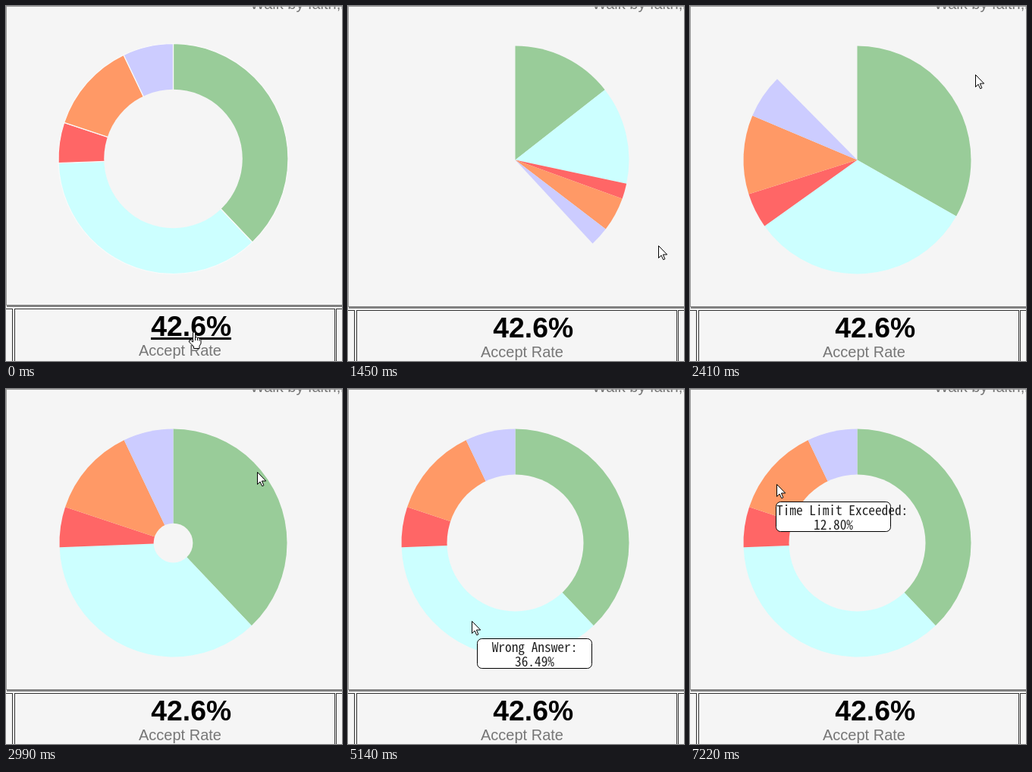
Animation of 443 by 467 pixels, one loop 8000 ms. Source, as an HTML page with a canvas:

```html
<!DOCTYPE html>
<html lang="en">
<head>
<meta charset="utf-8">
<title>Accept rate</title>
<style>
html, body { margin: 0; width: 100%; height: 100%; overflow: hidden; background: #f5f5f5; }
canvas { display: block; width: 443px; height: 467px; }
</style>
</head>
<body>
<canvas id="stage" width="443" height="467"></canvas>
<script>
const ctx = document.getElementById('stage').getContext('2d');
const LOOP = 8000, RELOAD = 720, LEAVE_LINK = 1010, TIPS_ON = 3450;
const TAU = Math.PI * 2;
const BG = '#f5f5f5';
const SANS = '"Liberation Sans", Arial, sans-serif';
const MONO = '300 17.33px "Noto Sans Mono CJK SC", "Noto Sans Mono", monospace';
const CX = 220.5, CY = 202.5, RADIUS = 150, HOLE = 90;

const slices = [
  { name: 'Accepted', share: 37.91, color: '#99cc99' },
  { name: 'Wrong Answer', share: 36.49, color: '#ccffff' },
  { name: 'Runtime Error', share: 5.69, color: '#ff6666' },
  { name: 'Time Limit Exceeded', share: 12.80, color: '#ff9966' },
  { name: 'Other', share: 7.11, color: '#ccccff' }
];

// Stops of the pointer: time, x, y.
const stops = [
  [0, 247, 428], [140, 247, 426], [870, 247, 426], [1450, 409, 315],
  [2410, 376, 90], [3400, 300, 122], [3800, 311, 146], [4350, 315, 270],
  [4750, 208, 305], [5140, 163, 305], [5730, 97, 185], [6830, 97, 185],
  [7150, 114, 125]
];

const arrow = new Path2D('M.5 .5V16.5L4 13L6.7 18.7L8.9 17.8L6.4 12H11.7Z');
const hand = new Path2D('M-.5 13V2Q1 -.5 2.5 2V8Q4.5 6.5 5.5 8.5Q7.3 7.5 8 9.5' +
  'Q10 9 10 11.5V16L8 19.5V22.5H.5V20L-5.5 14Q-6.2 11 -3.5 11.5L-.5 14Z' +
  'M2.5 8V12M5.5 8.5V12M8 9.5V12.5');

const clamp01 = v => Math.max(0, Math.min(1, v));
const ramp = (t, start, length) => clamp01((t - start) / length);

function pointerAt(t) {
  const next = stops.findIndex(s => s[0] > t);
  const b = stops[next < 0 ? stops.length - 1 : next];
  const a = next < 0 ? b : stops[next - 1];
  const k = a === b ? 0 : (t - a[0]) / (b[0] - a[0]);
  return [1, 2].map(i => Math.round(a[i] + (b[i] - a[i]) * k));
}

function sliceAt(x, y) {
  const dx = x - CX, dy = y - CY, r = Math.hypot(dx, dy);
  if (r < HOLE || r > RADIUS) return null;
  let rest = (Math.atan2(dx, -dy) / TAU + 1) % 1 * 100;
  return slices.find(s => (rest -= s.share) < 0);
}

function rect(x, y, w, h, color) {
  ctx.fillStyle = color;
  ctx.fillRect(x, y, w, h);
}

function text(str, x, y, font, color) {
  ctx.font = font;
  ctx.fillStyle = color;
  ctx.fillText(str, x, y);
}

function pie(cy, radius, hole, sweep, outlined) {
  let from = -TAU / 4;
  for (const s of slices) {
    const to = from + sweep * TAU * s.share / 100;
    ctx.beginPath();
    ctx.moveTo(CX, cy);
    ctx.arc(CX, cy, radius, from, to);
    ctx.closePath();
    ctx.fillStyle = s.color;
    ctx.fill();
    if (outlined) {
      ctx.strokeStyle = '#fafafa';
      ctx.lineWidth = 1.2;
      ctx.stroke();
    }
    from = to;
  }
  ctx.beginPath();
  ctx.arc(CX, cy, hole, 0, TAU);
  ctx.fillStyle = BG;
  ctx.fill();
}

function cell(left, right, top) {
  ctx.strokeStyle = '#333';
  ctx.lineWidth = 1;
  ctx.strokeRect(left + .5, top + .5, right - left, 90);
}

function page(dy, underlined) {
  text('Walk by faith,n', 322, 4, '20px ' + SANS, '#777');
  rect(0, 0, 443, 1, '#999');
  rect(0, 0, 1, 394 + dy, '#999');
  rect(1, 393 + dy, 442, 3, '#808080');
  cell(-100, 8, 398 + dy);
  cell(11, 433, 398 + dy);
  cell(435, 600, 398 + dy);
  text('42.6%', 191.3, 434 + dy, 'bold 37.33px ' + SANS, '#000');
  if (underlined) rect(191, 436 + dy, 106, 3, '#000');
  text('Accept Rate', 175, 460 + dy, '20px ' + SANS, '#777');
}

function tooltip(slice, x, y) {
  ctx.beginPath();
  ctx.roundRect(x + .5, y + .5, 151, 39, 6);
  ctx.fillStyle = '#fff';
  ctx.fill();
  ctx.strokeStyle = '#000';
  ctx.lineWidth = 1;
  ctx.stroke();
  ctx.font = MONO;
  [slice.name + ':', slice.share.toFixed(2) + '%'].forEach((line, i) => {
    const indent = Math.max(1, 76 - ctx.measureText(line).width / 2);
    text(line, x + indent, y + 18 + 19 * i, MONO, '#222');
  });
}

function cursor(shape, x, y) {
  ctx.save();
  ctx.translate(x, y);
  ctx.fillStyle = '#fff';
  ctx.strokeStyle = '#000';
  ctx.lineWidth = 1;
  ctx.lineJoin = 'round';
  ctx.fill(shape);
  ctx.stroke(shape);
  ctx.restore();
}

function draw(t) {
  const fresh = t >= RELOAD, onLink = t < LEAVE_LINK;
  rect(0, 0, 443, 467, BG);
  if (fresh) {
    const tick = t - t % 120;   // the chart redraws in visible steps
    pie(CY, RADIUS, HOLE * ramp(tick, 2650, 800), ramp(tick, 701, 1940), false);
  } else {
    pie(CY - 1.5, RADIUS + 1.5, HOLE + 1.3, 1, true);
  }
  page(fresh ? 2 : 0, onLink);

  const [x, y] = pointerAt(t);
  const hit = t >= TIPS_ON && sliceAt(x, y);
  if (hit) {
    const [lagX, lagY] = pointerAt(t - 70);   // the tooltip trails the pointer
    tooltip(hit, lagX - 1, lagY + 23);
  }
  cursor(onLink ? hand : arrow, x, y);
}

const start = performance.now();
function frame() {
  draw((performance.now() - start) % LOOP);
  requestAnimationFrame(frame);
}
frame();
</script>
</body>
</html>
```
